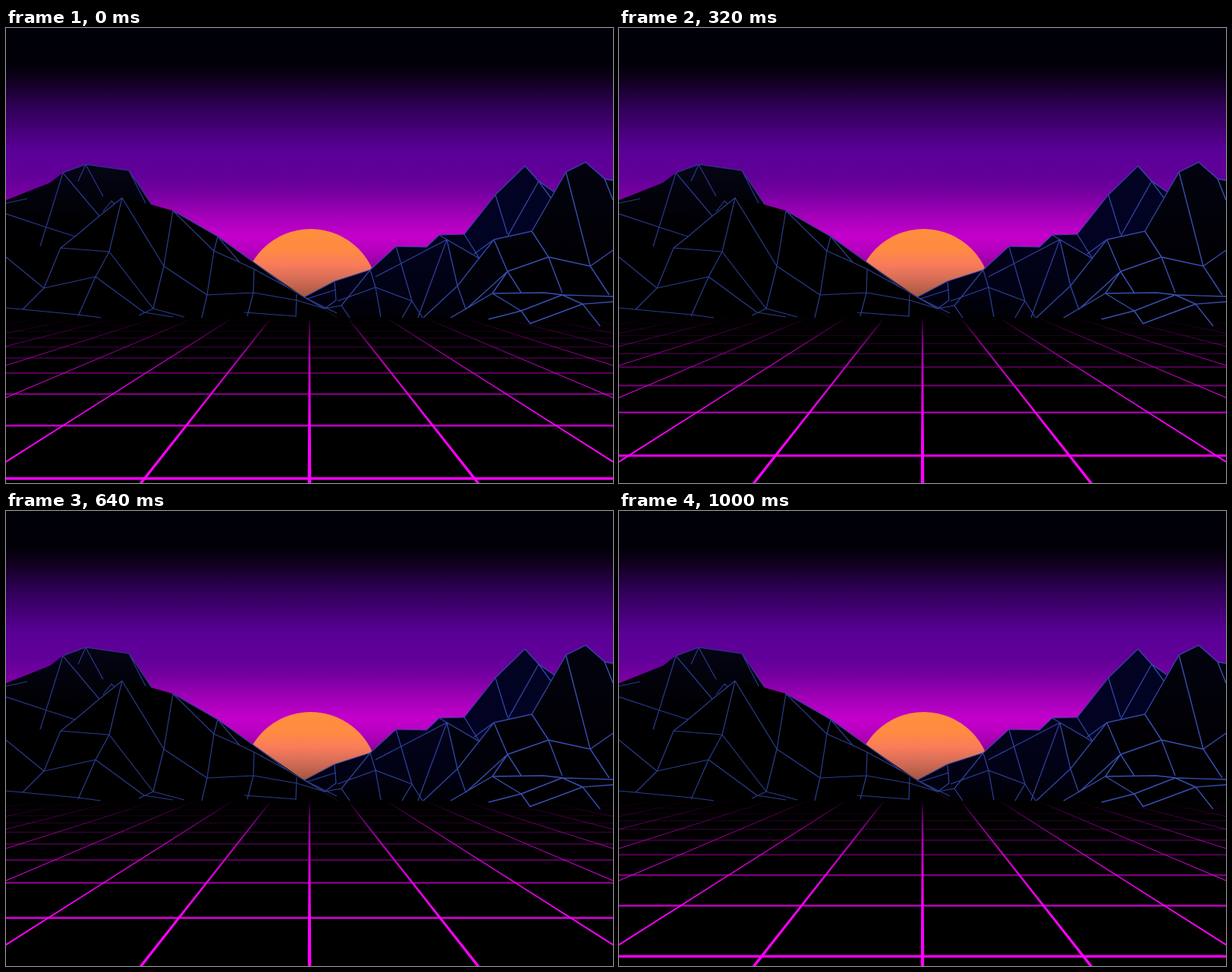
Write an HTML page with a canvas that moves like this. It is 800 by 600 pixels and loops after 1040 ms.

```html
<!DOCTYPE html>
<html lang="en">
<head>
<meta charset="utf-8">
<title>Neon sunset grid</title>
<style>
  html, body { margin: 0; width: 100%; height: 100%; overflow: hidden; background: #000; }
  svg, canvas { position: absolute; left: 0; top: 0; display: block; }
  .wire path { fill: none; stroke-linejoin: round; }
</style>
</head>
<body>
<svg width="800" height="600" viewBox="0 0 800 600">
  <defs>
    <linearGradient id="sky" gradientUnits="userSpaceOnUse" x1="0" y1="0" x2="0" y2="400">
      <stop offset="0" stop-color="#000008"/>
      <stop offset=".12" stop-color="#010009"/>
      <stop offset=".165" stop-color="#0e001a"/>
      <stop offset=".25" stop-color="#2b0050"/>
      <stop offset=".4" stop-color="#590096"/>
      <stop offset=".49" stop-color="#62009a"/>
      <stop offset=".54" stop-color="#7400a0"/>
      <stop offset=".62" stop-color="#a400b8"/>
      <stop offset=".685" stop-color="#c400cc"/>
      <stop offset=".73" stop-color="#b800c0"/>
      <stop offset=".8" stop-color="#8a0096"/>
    </linearGradient>
    <linearGradient id="sun" gradientUnits="userSpaceOnUse" x1="0" y1="265" x2="0" y2="357">
      <stop offset="0" stop-color="#ff8f3c"/>
      <stop offset=".3" stop-color="#ff8a42"/>
      <stop offset=".5" stop-color="#fa7c5a"/>
      <stop offset=".7" stop-color="#d86e58"/>
      <stop offset="1" stop-color="#a0543c"/>
    </linearGradient>
    <linearGradient id="slope" gradientUnits="userSpaceOnUse" x1="0" y1="270" x2="0" y2="384">
      <stop offset="0" stop-color="#02021c"/>
      <stop offset=".6" stop-color="#020216"/>
      <stop offset="1" stop-color="#000004"/>
    </linearGradient>
    <linearGradient id="far" gradientUnits="userSpaceOnUse" x1="0" y1="180" x2="0" y2="260">
      <stop offset="0" stop-color="#050516"/>
      <stop offset="1" stop-color="#000002"/>
    </linearGradient>
    <linearGradient id="near" gradientUnits="userSpaceOnUse" x1="0" y1="180" x2="0" y2="320">
      <stop offset="0" stop-color="#030310"/>
      <stop offset="1" stop-color="#000002"/>
    </linearGradient>
  </defs>

  <rect width="800" height="382" fill="url(#sky)"/>
  <circle cx="401.5" cy="354" r="89" fill="url(#sun)"/>

  <path fill="url(#far)" d="M0 227L58 204 75 191 105 180 162 188 192 233 192 300 0 300Z"/>
  <path fill="#000" d="M0 290L72 290 153 224 192 233 220 241 279 275 325 308 393 355 440 384 0 384Z"/>
  <path fill="url(#slope)" d="M393 355L433 334 480 319 514 288 554 289 571 273 604 272 800 272 800 384 440 384Z"/>
  <path fill="#020222" d="M604 272L645 220 684 182 702 202 722 216 722 300 624 304Z"/>
  <path fill="url(#near)" d="M693 268L723 215 738 190 764 177 789 199 800 201 800 384 586 384 606 371 661 321 643 279Z"/>
  <path fill="#01010a" d="M581 279L624 304 643 279 661 321 606 371 595 340Z"/>
  <rect y="382" width="800" height="218" fill="#000"/>

  <g class="wire">
    <!-- left, far ridge -->
    <path stroke="#2a3890" stroke-width="1.2" d="M0 231L28 225M0 245L54 263 91 275M75 191L45 288M75 191L123 248
      M105 180L95 202M105 180L128 222M75 191L105 180 162 188 192 233M162 188L184 231M128 242L139 228 143 232"/>
    <!-- left, near slope -->
    <path stroke="#2b3c90" stroke-width="1.2" d="M72 290L91 275 123 248 153 224 136 295 72 290 50 343 118 328 136 295 194 370 208 314 153 224
      M0 302L50 343 22 371M0 369L95 378 125 382M95 380L118 328 182 375 220 381M175 379L194 370 235 381
      M208 314L220 241 274 294 265 352 208 314M220 241L279 275 308 309M274 294L279 275"/>
    <path stroke="#2b3c90" stroke-width="1.2" d="M274 294L308 309 327 318 373 343 393 355 436 376M258 382L265 352 326 349 383 359 420 370
      M383 351L382 381M327 318L326 349 318 380M314 375L382 380M279 275L325 308 373 343"/>
    <!-- right, low ridge -->
    <path stroke="#2f41a0" stroke-width="1.2" d="M393 355L433 334 480 319 514 288 554 289 571 273 604 272 645 220 684 182
      M393 355L420 370 442 366 480 319 487 342 494 381M433 334L435 359 420 370M397 357L435 345M442 366L453 382
      M437 360L487 342 535 360 522 382M514 288L535 360 549 382M487 328L581 279 543 382M571 273L581 279"/>
    <!-- right, peaks -->
    <path stroke="#3246a8" stroke-width="1.3" d="M581 279L595 340 606 371M581 279L624 304 604 272M550 382L595 340 643 279 693 268 723 216 738 190 764 177 789 199 800 201
      M617 298L643 279M645 220L661 272M702 202L661 275M684 182L702 202 722 216M702 202L718 224"/>
    <!-- right, near slope -->
    <path stroke="#384eb2" stroke-width="1.4" d="M643 279L661 321 679 349M606 371L661 321 715 302 770 314 738 190M693 268L715 302 733 349
      M800 293L770 314 795 352M789 199L800 227M586 382L641 350 708 349 735 352 800 354M661 321L641 350 679 373 636 384
      M679 373L691 390M690 390L760 364 800 361M679 373L733 352 760 364 783 393"/>
  </g>
</svg>
<canvas id="floor" width="800" height="600"></canvas>

<script>
const ctx = document.getElementById('floor').getContext('2d');
const LOOP = 1040, STEP = 40;
const HORIZON = 318, DEPTH = 816.3, SPREAD = 0.7875, TOP = 383;

// [time, distance of the leading row in cells]
const travel = [[0, 3.957], [120, 3.698], [320, 3.319], [480, 3.057],
                [640, 2.735], [800, 2.414], [1000, 2.032], [1040, 1.957]];

// [y, opacity] of the fade toward the mountains
const fade = [[380, 0], [400, .35], [420, .55], [440, .7], [480, .85], [540, 1], [600, 1]];

const mask = ctx.createLinearGradient(0, 380, 0, 600);
for (const [y, a] of fade) mask.addColorStop((y - 380) / 220, `rgba(0,0,0,${a})`);

function lerpTable(table, t) {
  const i = Math.max(1, table.findIndex(p => p[0] >= t));
  const [t0, v0] = table[i - 1], [t1, v1] = table[i];
  return v0 + (v1 - v0) * (t - t0) / (t1 - t0);
}

function drawRay(k) {
  const edge = (y, side) => 400 + (y - HORIZON) * k * SPREAD + side * (1 + (y - TOP) * 0.0058);
  ctx.beginPath();
  ctx.moveTo(edge(TOP, -1), TOP);
  ctx.lineTo(edge(TOP, 1), TOP);
  ctx.lineTo(edge(600, 1), 600);
  ctx.lineTo(edge(600, -1), 600);
  ctx.fill();
}

function drawRow(q) {
  const d = DEPTH / q, y = HORIZON + d;
  const thick = 3.5 * (d / 276) ** 0.9;
  ctx.globalAlpha = Math.min(1, Math.max(0, (y - 370) / 230) ** 0.7);
  ctx.fillRect(0, y - thick / 2, 800, thick);
  ctx.globalAlpha = 1;
}

function draw(t) {
  const phase = lerpTable(travel, t) % 1;
  ctx.globalCompositeOperation = 'source-over';
  ctx.clearRect(0, 0, 800, 600);
  ctx.fillStyle = '#f0f';
  for (let k = -8; k <= 8; k++) drawRay(k);
  for (let n = 2; n < 13; n++) drawRow(n + phase);
  ctx.globalCompositeOperation = 'destination-in';
  ctx.fillStyle = mask;
  ctx.fillRect(0, 0, 800, 600);
}

const start = performance.now();
function tick() {
  const t = (performance.now() - start) % LOOP;
  draw(Math.floor(t / STEP) * STEP);
  requestAnimationFrame(tick);
}
tick();
</script>
</body>
</html>
```
